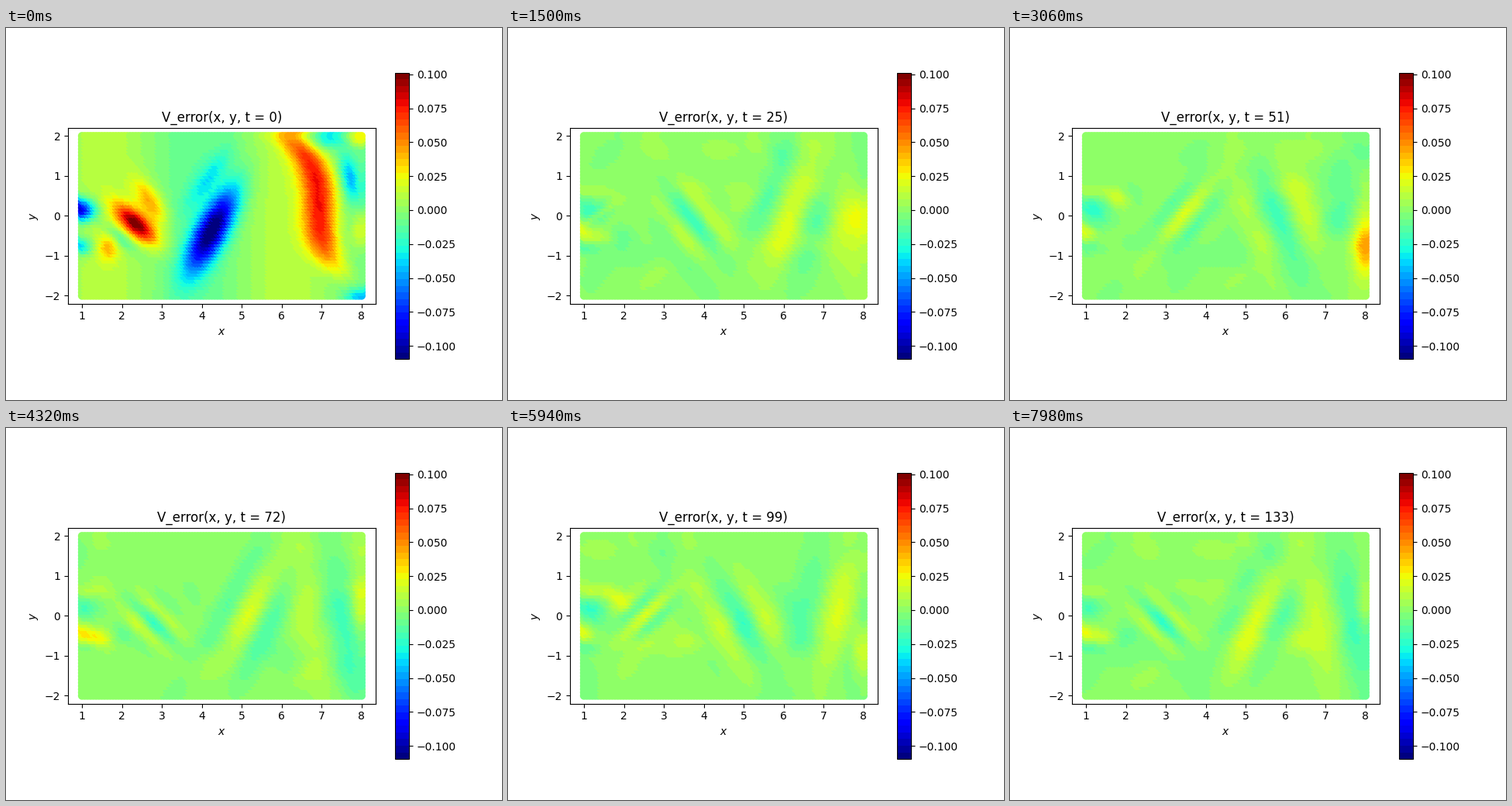
A matplotlib script that plays this animation: 640x480 px, repeating every 8 s.

```python
import numpy as np
import matplotlib.pyplot as plt
from matplotlib.animation import FuncAnimation
from matplotlib.cm import ScalarMappable
from matplotlib.colors import Normalize

W, H, DPI = 640, 480, 100
VMIN, VMAX, LEVELS = -0.1098, 0.1013, 43
STEPS, HOLD, TICK = 134, 3, 20      # each step is held for 3 ticks of 20 ms
FRAMES = 400
RADIUS = 3.75 * DPI / 72            # marker radius with its outline

SETTLE = 15                         # steps until the starting error is gone
SPACING, SPEED = 2.4, 0.081         # wake cells: distance and drift per step
PERIOD = 2 * SPACING / SPEED

# Sample points, x varying fastest
gx, gy = np.meshgrid(np.linspace(1, 8, 100), np.linspace(-2, 2, 50))
gx, gy = gx.ravel(), gy.ravel()


def along_across(x, y, angle):
    c, s = np.cos(np.radians(angle)), np.sin(np.radians(angle))
    dx, dy = gx - x, gy - y
    return dx * c + dy * s, dy * c - dx * s


def blob(strength, x, y, length, width, angle=0):
    u, v = along_across(x, y, angle)
    return strength * np.exp(-(u / length) ** 2 - (v / width) ** 2)


def start_error(t):
    """Large error of the first moments, drifting slowly downstream."""
    d = 0.055 * t
    bend = np.polyfit([-1.2, 0, 1.2, 2], [7.35, 7.0, 6.85, 6.25], 3)
    ridge = np.exp(-((gx - d - np.polyval(bend, gy)) / .43) ** 2
                   - ((gy - .45) / 1.7) ** 4)
    return (.011 * np.cos(2 * np.pi * (gx - d - 1.6) / 4.6)
            + .072 * ridge
            + blob(-.108, 4.3 + d, -.3, 1.15, .38, 62)
            + blob(-.025, 4.2 + d, 1.0, .9, .25, 54)
            + blob(.098, 2.4 + d, -.15, .65, .28, -42)
            + blob(.042, 2.75 + d, .4, .65, .28, -58)
            + blob(-.025, 2.0 + d, -.5, .5, .18, -40)
            + blob(-.1, .95, .2, .4, .28)
            + blob(-.045, 1, -.7, .28, .22)
            + blob(.03, 1.7, -.75, .25, .35)
            + blob(-.04, 7.75, 1, .6, .22, -78)
            + blob(-.035, 7.2, 2, .4, .25)
            + blob(.035, 8, 2, .28, .2)
            + blob(.025, 8, -.3, .2, .5)
            + blob(-.035, 8, -2, .35, .25))


def street(t):
    """Striped cells that tilt to and fro in turn as they move downstream."""
    total = 0
    for m in range(-7, 2):
        x = 5.4 + SPACING * m + SPEED * (t - SETTLE)
        if not .5 < x < 9.5:
            continue
        side = 1 if m % 2 == 0 else -1
        u, v = along_across(x, .1 * side, side * min(24 + 7.4 * x, 80))
        pitch = .25 * x
        envelope = np.exp(-(u / (.25 + .2 * x)) ** 2 - (v / (.7 * pitch)) ** 2)
        grow = .5 + .5 * np.tanh(2 * (x - 1.6))
        total += .019 * side * grow * envelope * np.cos(2 * np.pi * v / pitch)
    return total


def borders(t):
    """Inlet and outlet spots that pulse with the shedding."""
    c = np.cos(2 * np.pi * (t - SETTLE) / PERIOD)
    up, down = (1 + c) / 2, (1 - c) / 2
    return (blob(-.018, 1.1, .25, .35, .26) + blob(-.011, 1.1, -.75, .35, .15)
            + blob(.022, 1, -.36, .25, .2) + blob(.009, 1.2, .67, .4, .14)
            + up * (blob(.017, 1.45, -.47, .35, .2) - blob(.012, 2, -.45, .3, .25))
            + down * (blob(.02, 1.85, .5, .35, .22, -30) - blob(.012, 1.4, .05, .35, .35))
            + blob(.018 + .012 * down, 8, -.3 + .6 * c, .24, .6))


rng = np.random.default_rng(4)
specks = [(rng.choice([-.005, .006]), rng.uniform(0, 9), rng.uniform(-2, 2),
           rng.uniform(.35, .8), rng.uniform(.2, .35), rng.uniform(-70, 70))
          for _ in range(26)]


def mottle(t):
    return sum(blob(a, (x + SPEED * t) % 9, y, length, width, angle)
               for a, x, y, length, width, angle in specks)


def field(t):
    s = min(t / SETTLE, 1)
    settled = s * (street(t) + borders(t) + mottle(t))
    return settled if s == 1 else settled + (1 - s) ** 2 * start_error(t)


def marker_map(px, py, w, h):
    """Topmost marker and opacity for every pixel of the plot area."""
    owner = np.full((h, w), -1)
    clear = np.ones((h, w))
    for i, (x, y) in enumerate(zip(px, py)):
        c0, r0 = max(int(x) - 7, 0), max(int(y) - 7, 0)
        box = np.s_[r0:int(y) + 8, c0:int(x) + 8]
        own = owner[box]
        rows, cols = np.indices(own.shape)
        dist = np.hypot(cols + c0 + .5 - x, rows + r0 + .5 - y)
        own[(dist < RADIUS) | ((own < 0) & (dist < RADIUS + .5))] = i
        clear[box] *= 1 - np.clip(RADIUS + .5 - dist, 0, 1)
    return np.maximum(owner, 0), (255 * (1 - clear)).astype(np.uint8)


fig = plt.figure(figsize=(W / DPI, H / DPI), dpi=DPI)
ax = fig.add_subplot()
ax.set(xlim=(.65, 8.35), ylim=(-2.2, 2.2), xlabel="$x$", ylabel="$y$")
ax.set_xticks(range(1, 9))
ax.set_yticks(range(-2, 3))
ax.set_aspect("equal")
ax.set_facecolor("none")
title = ax.set_title("V_error(x, y, t = 0)")

cmap = plt.get_cmap("jet", LEVELS)
fig.colorbar(ScalarMappable(Normalize(VMIN, VMAX), cmap), ax=ax)
fig.canvas.draw()

LEFT, BOTTOM, PW, PH = 91, 128, 376, 220
px, py = ax.transData.transform(np.column_stack([gx, gy])).T
owner, opacity = marker_map(px - LEFT, py - BOTTOM, PW, PH)

palette = cmap(np.arange(LEVELS), bytes=True)
scale = LEVELS / (VMAX - VMIN)
bins = [np.clip((field(t) - VMIN) * scale, 0, LEVELS - 1).astype(int)
        for t in range(STEPS)]


def picture(t):
    rgba = palette[bins[t]][owner]
    rgba[..., 3] = opacity
    return rgba


image = fig.figimage(picture(0), LEFT, BOTTOM, origin="lower")


def update(frame):
    t = frame // HOLD
    image.set_data(picture(t))
    title.set_text(f"V_error(x, y, t = {t})")
    return image, title


anim = FuncAnimation(fig, update, frames=FRAMES, interval=TICK,
                     repeat=True, repeat_delay=0, blit=False)
plt.show()
```
